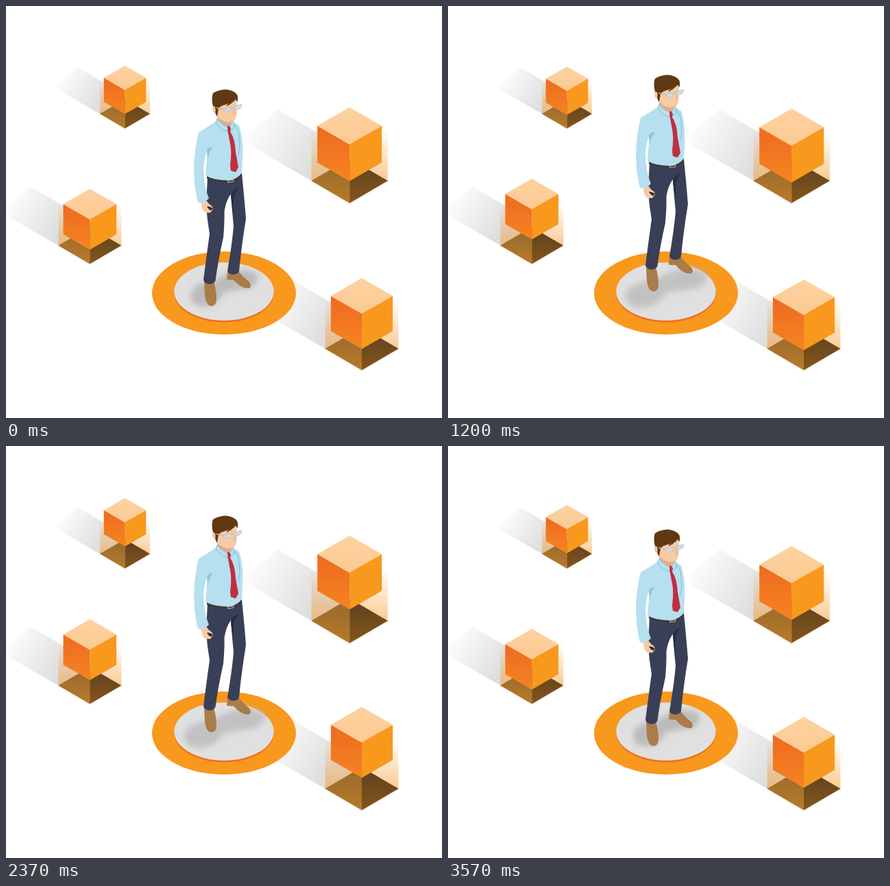
An HTML page for the animation above (3.6 s loop, 636x600 px).

```html
<!DOCTYPE html>
<html lang="en">
<head>
<meta charset="utf-8">
<title>Floating cubes</title>
<style>
  html, body { margin: 0; width: 100%; height: 100%; overflow: hidden; background: #fff; }
  svg { display: block; }
</style>
</head>
<body>
<svg width="636" height="600" viewBox="0 0 636 600">
  <defs>
    <linearGradient id="shade" gradientUnits="userSpaceOnUse" x1="-50" y1="-30" x2="-146" y2="-88">
      <stop stop-color="#dedede"/><stop offset="1" stop-color="#dedede" stop-opacity="0"/>
    </linearGradient>
    <linearGradient id="glow" gradientUnits="userSpaceOnUse" x1="0" y1="-75" x2="0" y2="32">
      <stop stop-color="#f7931e" stop-opacity="0"/><stop offset="1" stop-color="#f7931e" stop-opacity=".7"/>
    </linearGradient>
    <linearGradient id="baseLeft" x1="0" y1="0" x2="0" y2="1">
      <stop stop-color="#94692f"/><stop offset="1" stop-color="#b87a28"/>
    </linearGradient>
    <linearGradient id="baseRight" x1="0" y1="0" x2="0" y2="1">
      <stop stop-color="#5c4020"/><stop offset="1" stop-color="#84551a"/>
    </linearGradient>
    <linearGradient id="faceLeft" x1="0" y1="0" x2="0" y2="1">
      <stop stop-color="#ee6a20"/><stop offset="1" stop-color="#f58422"/>
    </linearGradient>
    <linearGradient id="faceTop" x1="0" y1="0" x2="0" y2="1">
      <stop stop-color="#fdd2a0"/><stop offset="1" stop-color="#fcca92"/>
    </linearGradient>
    <filter id="soft" x="-20%" y="-30%" width="140%" height="160%"><feGaussianBlur stdDeviation="4"/></filter>

    <path id="shadow" fill="url(#shade)" d="M0 32L-55.7 0L-160-60L-105-104L-55.7-75L0-43Z"/>
    <g id="base">
      <path fill="#000" opacity=".06" d="M-57 1L0-32L57 1L0 35Z"/>
      <path fill="url(#glow)" d="M-55.7-75V0L0 32.5L55.7 0V-75Z"/>
      <path fill="url(#baseLeft)" d="M-55.7 0L0-32.5V32.5Z"/>
      <path fill="url(#baseRight)" d="M55.7 0L0-32.5V32.5Z"/>
    </g>
    <g id="cube">
      <path fill="#f8981d" d="M0 53L47 27V80.500L0 107.500Z"/>
      <path fill="url(#faceLeft)" d="M0 54L-47 27V80.500L0 107.500Z"/>
      <path fill="url(#faceTop)" d="M0 0L47 27L0 54L-47 27Z"/>
    </g>
  </defs>

  <g id="shadows"></g>

  <ellipse cx="318" cy="418" rx="105" ry="60.500" fill="#f8981d"/>
  <ellipse cx="318" cy="418.300" rx="72.700" ry="42.300" fill="#f0701f"/>
  <ellipse cx="318" cy="415.700" rx="72.700" ry="42.300" fill="#e0e0e0"/>
  <g id="footShadow" filter="url(#soft)">
    <path fill="#b5b5b5" d="M270 417Q277 402 300 401L325 388Q352 379 366 390Q372 401 356 411L318 417Q311 434 291 438Q267 438 270 417Z"/>
  </g>

  <g id="man">
    <path fill="#a97c4a" d="M289 401H303Q307 415 307 427Q307 436 300 437Q292 437 290 421Z"/>
    <path fill="#a97c4a" d="M323 387L340 387Q345 394 355 402Q359 408 355 411Q345 412 335 402Q331 397 329 399L322 398Z"/>
    <path fill="#393f56" d="M294 249L292 289Q293 310 297 332Q293 360 288 399Q290 405 298 405Q304 404 305.500 400Q309 373 317 337Q319 315 318.500 299Q321 283 328 274Q330 300 332 320Q330 345 323 386Q325 391 332 391Q339 390 340 386Q343 353 350 310Q348 283 344 244Z"/>
    <path fill="#282d42" d="M339 264Q329 268 328 277L332 310Q331 285 333 275Z"/>
    <path fill="#42352f" d="M293 247Q306 253 325 254Q338 251 344 243V247Q338 255 325 257Q305 256 293 251Z"/>
    <path fill="none" stroke="#b9b5ac" d="M323.500 254.500L332 252.500V255.500L323.500 257Z"/>
    <path fill="#f6caa2" d="M285 286L292 283Q296 289 301 292L302 296L298 301L291 301Q285 297 285 286Z"/>
    <path fill="#2c2c38" d="M293 292Q296 291 302 295L299 298Q295 296 293 292Z"/>
    <path fill="#b6dff0" d="M306 168Q298 174 281 184Q275 207 274 238Q275 268 280 286Q288 289 296 280Q289 264 288 237Q289 220 294 210L291 247Q303 254 325 254Q338 252 344 243L345.500 212Q345 188 340 174L331 168Z"/>
    <path fill="#91c6d2" d="M302 205.500Q294 205 293 211L294.500 224Q296 211 302 205.500Z"/>
    <path fill="none" stroke="#8dc4d4" stroke-width="1.300" d="M333 173Q340 179 340 191Q342 206 339 217"/>
    <path fill="#e3ad84" d="M309 156L308 168Q316 177 324 177L330 170V162Z"/>
    <path fill="#b6dff0" stroke="#87bccb" d="M308 164L306 170Q312 180 323 183L326 176Q316 175 308 164ZM331 167L333 177L328 181L326 176Z"/>
    <path fill="#be2f40" d="M323 175L325 174L328 178L327 183Q334 193 335 213L339 235L335 242L328 240L327 232Q330 212 326 195L323.500 182Z"/>
    <path fill="#f6caa2" d="M308 141L335 135Q338 145 337 152Q337 164 331 169Q322 172 312 165Q307 158 306 153Z"/>
    <path fill="#e3ad84" d="M312 164Q321 172 331 167Q327 172 320 171Q314 170 312 164Z"/>
    <path fill="#603813" d="M302 146Q299 134 302 127Q309 122 321 121.500Q333 123 337 129Q339 133 337.500 140L335 136Q331 142 322 143Q313 145 310 149L308 161Q305 157 304 149Z"/>
    <path fill="#f6caa2" d="M301 147Q305 144 306 150L305 156Q300 154 301 147Z"/>
    <path fill="#603813" d="M305 146L308 146V152L306 153ZM322 144L329 141V142L322 146Z"/>
    <path fill="none" stroke="#e3ad84" d="M332 150L334 157L331 157.500"/>
    <path fill="none" stroke="#b8bec5" stroke-width="1.400" d="M307 148L318 151M328 149L334 147"/>
    <path fill="#d3dce3" stroke="#b8bec5" stroke-width=".8" d="M318 150L329 147L327 153L319 155ZM333 146L344 143L342 149L334 151Z"/>
  </g>

  <g id="cubes"></g>
</svg>
<script>
  const LOOP = 3600, STEP = 30;
  const $ = id => document.getElementById(id);
  const cosine = s => (1 - Math.cos(Math.PI * s)) / 2;

  // Base centre, scale, and whether the cube rises together with the man.
  const places = [
    [173.5, 157, .655, false],
    [501.2, 254.5, 1, false],
    [122.3, 348.7, .825, true],
    [519, 499, .96, false]
  ];

  // Alternating lowest and highest moments of the three other cubes.
  const turns = [-325, 570, 1475, 2385, 3245, 4030];

  function addUse(parent, name, transform) {
    const use = document.createElementNS('http://www.w3.org/2000/svg', 'use');
    use.setAttribute('href', '#' + name);
    use.setAttribute('transform', transform);
    parent.append(use);
    return use;
  }

  const cubes = places.map(([x, y, scale, withMan]) => {
    const transform = `translate(${x} ${y}) scale(${scale})`;
    addUse($('shadows'), 'shadow', transform);
    addUse($('cubes'), 'base', transform);
    return { body: addUse($('cubes'), 'cube', transform), transform, withMan };
  });

  function otherLift(t) {
    let i = 0;
    while (t >= turns[i + 1]) i++;
    const rise = cosine((t - turns[i]) / (turns[i + 1] - turns[i]));
    return i % 2 ? 1 - rise : rise;
  }

  function draw(now) {
    const t = Math.floor(now % LOOP / STEP) * STEP;
    const manLift = cosine(t / 900), lift = otherLift(t);
    $('man').setAttribute('transform', `translate(0 ${-28.5 * manLift})`);
    const spread = 1 + .28 * manLift;
    $('footShadow').setAttribute('transform',
      `translate(318 409) scale(${spread} ${1 + .1 * manLift}) translate(-318 -409)`);
    $('footShadow').setAttribute('opacity', .85 - .2 * manLift);
    for (const { body, transform, withMan } of cubes) {
      const y = -100 - 24 * (withMan ? manLift : lift);
      body.setAttribute('transform', `${transform} translate(0 ${y})`);
    }
  }

  const start = performance.now();
  function tick() {
    draw(performance.now() - start);
    requestAnimationFrame(tick);
  }
  tick();
</script>
</body>
</html>
```
